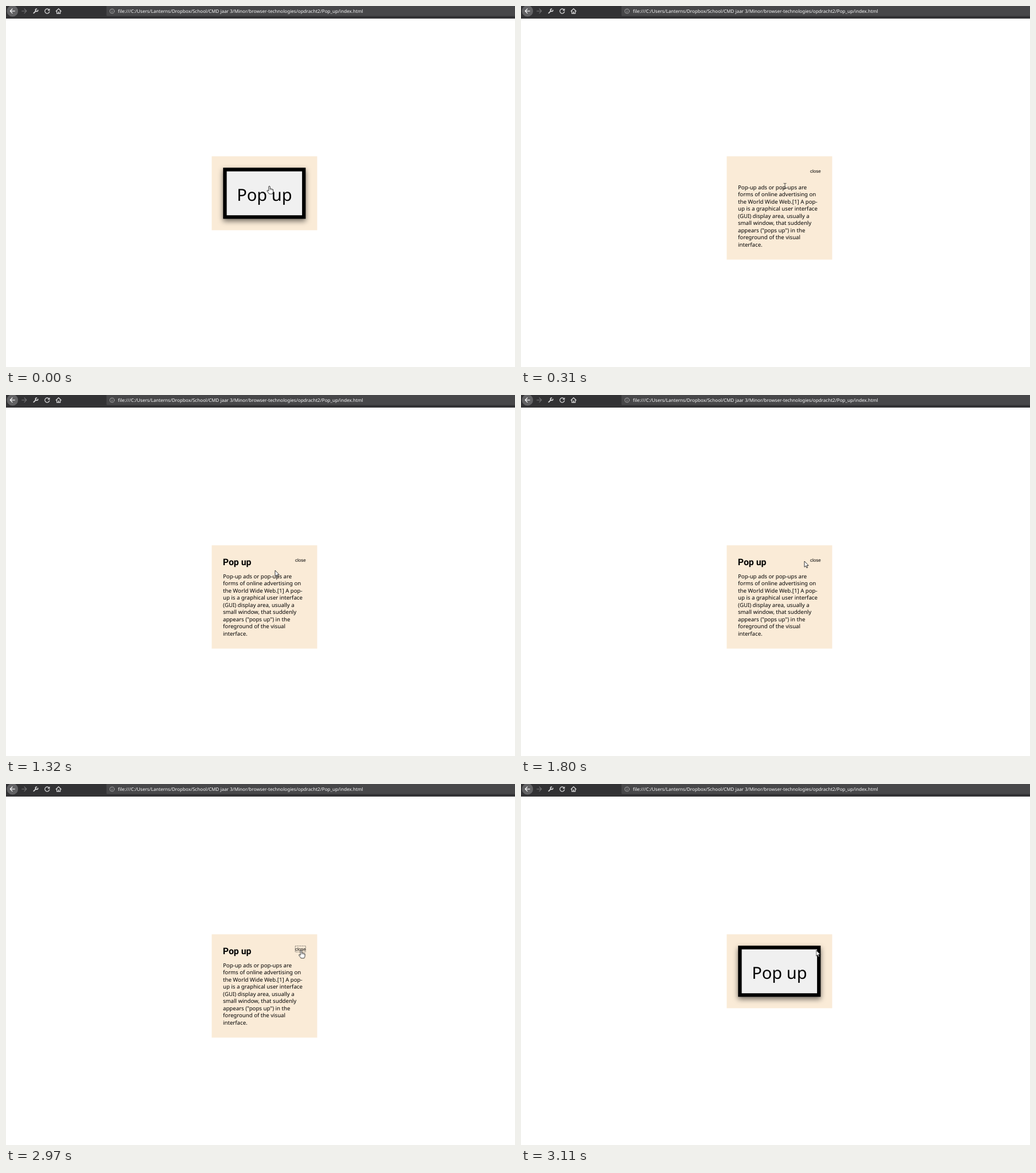
These frames come from a looping animation (889x630 px, 3.34 s). An HTML page:

```html
<!DOCTYPE html>
<html lang="en">
<head>
<meta charset="utf-8">
<title>Pop up</title>
<style>
  html, body { margin: 0; width: 100%; height: 100%; overflow: hidden; background: #fff; }
  svg { display: block; width: 889px; height: 630px; }
  text { text-rendering: geometricPrecision; white-space: pre; }
  .ui { font-family: "Noto Sans", "Open Sans", sans-serif; }
  .title { font: bold 15.8px Roboto, sans-serif; }
  .close { font: 8px "Liberation Sans", Arial, sans-serif; }
  .icon { fill: none; stroke: #d4d4d5; stroke-width: 1.3; stroke-linecap: round; stroke-linejoin: round; }
  .focus { fill: none; stroke: #333; stroke-width: .7; stroke-dasharray: .8 .5; }
  .pointer { fill: #fff; stroke: #111; stroke-width: .85; stroke-linejoin: round; }
  #button rect:first-child { filter: drop-shadow(0 4px 5px rgba(0, 0, 0, .55)); }
</style>
</head>
<body>
<svg viewBox="0 0 889 630">
  <defs>
    <path id="arrow" d="M-4 0H4M-4 0L-.3-3.8M-4 0L-.3 3.8"/>
  </defs>

  <g id="toolbar">
    <rect width="889" height="21.7" fill="#323234"/>
    <rect y="20.9" width="889" height=".8" fill="#222224"/>
    <rect x="175.5" y="-3" width="720" height="20.5" rx="1.5" fill="#474749"/>
    <circle cx="11.3" cy="8.8" r="9.8" fill="#626264"/>
    <use href="#arrow" class="icon" transform="translate(11.3 8.8)" style="stroke:#f4f4f5"/>
    <use href="#arrow" class="icon" transform="translate(31.8 8.8) scale(-1 1)" style="stroke:#6c6c6e"/>
    <path class="icon" style="stroke-width:1.9" d="M48.4 12.3L52.4 8.3"/>
    <path class="icon" style="stroke-width:1.6" d="M53.6 5.1A2.2 2.2 0 1 0 55.8 7.3"/>
    <path class="icon" d="M75 6.5A4 4 0 1 0 75.8 9.9"/>
    <path fill="#d4d4d5" d="M76.5 4.2V8.3H72.4Z"/>
    <path class="icon" d="M87.4 9L91.8 4.8L96.2 9M88.8 8.5V13H94.8V8.5"/>
    <path class="icon" style="stroke-width:1.6" d="M91.8 12.5V10.2"/>
    <g class="icon" style="stroke:#b5b5b7;stroke-width:.8">
      <circle cx="185.2" cy="9" r="3.9"/>
      <path d="M185.2 8.7V11M185.2 6.9V7"/>
    </g>
    <text class="ui" x="195.6" y="12.4" font-size="8.11" fill="#f9f9fa">file:///C:/Users/Lanterns/Dropbox/School/CMD jaar 3/Minor/browser-technologies/opdracht2/Pop_up/index.html</text>
  </g>

  <g id="closed">
    <rect x="359.3" y="262.3" width="184.2" height="129" fill="#faebd7"/>
    <g id="button">
      <rect x="379.2" y="282.2" width="144.2" height="89.2"/>
      <rect x="385.5" y="288.6" width="131.6" height="76.6" fill="#f0f0f0"/>
      <text class="ui" x="451.4" y="339.5" font-size="29" text-anchor="middle">Pop up</text>
    </g>
    <rect id="buttonFocus" class="focus" x="404.5" y="308" width="93.5" height="38"/>
  </g>

  <g id="opened">
    <rect x="359.3" y="262.3" width="184.2" height="180.3" fill="#faebd7"/>
    <text id="heading" class="title" x="378.8" y="297.1">Pop up</text>
    <text class="close" x="505" y="290.8">close</text>
    <rect id="closeFocus" class="focus" x="505.2" y="282.7" width="18.2" height="10.4"/>
    <g id="copy" class="ui" font-size="9.65"></g>
  </g>

  <g id="cursor">
    <g id="hand">
      <path class="pointer" d="M-1.2 1Q0-.8 1.2 1V5Q2.4 4.2 3.3 5.3Q4.6 4.7 5.2 5.9Q6.6 5.6 6.6 7.2V10.2Q6.4 12 5.2 14H-.2Q-2 11.4-3.9 9.1Q-4.4 7.3-2.6 7.8L-1.2 9Z"/>
      <path fill="none" stroke="#111" stroke-width=".6" d="M1.2 5V7.4M3.3 5.4V7.5M5.2 6V7.8"/>
    </g>
    <path id="beam" fill="none" stroke="#222" stroke-width=".8" d="M-2.4-4.5H-.5L0-4L.5-4.5H2.4M0-4V4M-2.4 4.5H-.5L0 4L.5 4.5H2.4"/>
    <path id="point" class="pointer" d="M0 0V10.3L2.4 8.2L4 11.8L5.6 11.1L4 7.6H7.2Z"/>
  </g>
</svg>

<script>
const LOOP = 3340;
const $ = id => document.getElementById(id);

const lines = [
  "Pop-up ads or pop-ups are",
  "forms of online advertising on",
  "the World Wide Web.[1] A pop-",
  "up is a graphical user interface",
  "(GUI) display area, usually a",
  "small window, that suddenly",
  "appears (\"pops up\") in the",
  "foreground of the visual",
  "interface."
];
lines.forEach((line, i) => {
  const text = document.createElementNS("http://www.w3.org/2000/svg", "text");
  text.setAttribute("x", 379);
  text.setAttribute("y", 319.6 + i * 12.5);
  text.textContent = line;
  $("copy").append(text);
});

// Holds each [time, value] until the next one.
function hold(id, property, steps) {
  const frames = steps.map(([time, value]) =>
    ({ offset: time / LOOP, [property]: value, easing: "step-end" }));
  frames.push({ offset: 1, [property]: steps.at(-1)[1] });
  $(id).animate(frames, { duration: LOOP, iterations: Infinity }).startTime = 0;
}

// Visible only within the given [from, to] spans.
function show(id, ...spans) {
  const steps = spans.flatMap(([from, to]) => to < LOOP ? [[from, 1], [to, 0]] : [[from, 1]]);
  if (steps[0][0] > 0) steps.unshift([0, 0]);
  hold(id, "opacity", steps);
}

show("closed", [0, 310], [3030, LOOP]);
show("buttonFocus", [220, 310]);
show("opened", [310, 3030]);
show("heading", [400, 3030]);
show("closeFocus", [2970, 3030]);
show("hand", [0, 310], [2100, 3110]);
show("beam", [310, 1320]);
show("point", [1320, 2100], [3110, LOOP]);

const path = [
  [0, 460, 314], [310, 461, 314],
  [1320, 470, 306], [1410, 476, 302], [1480, 481, 298], [1560, 486, 295],
  [1640, 490, 292], [1720, 493, 291], [1800, 495, 290],
  [1880, 497, 290], [1960, 500, 290], [2030, 503, 290], [2100, 506, 290],
  [2180, 509, 290], [2250, 512, 290], [2330, 514, 290], [2400, 515.5, 290]
];
hold("cursor", "transform", path.map(([time, x, y]) => [time, `translate(${x}px, ${y}px)`]));
</script>
</body>
</html>
```
